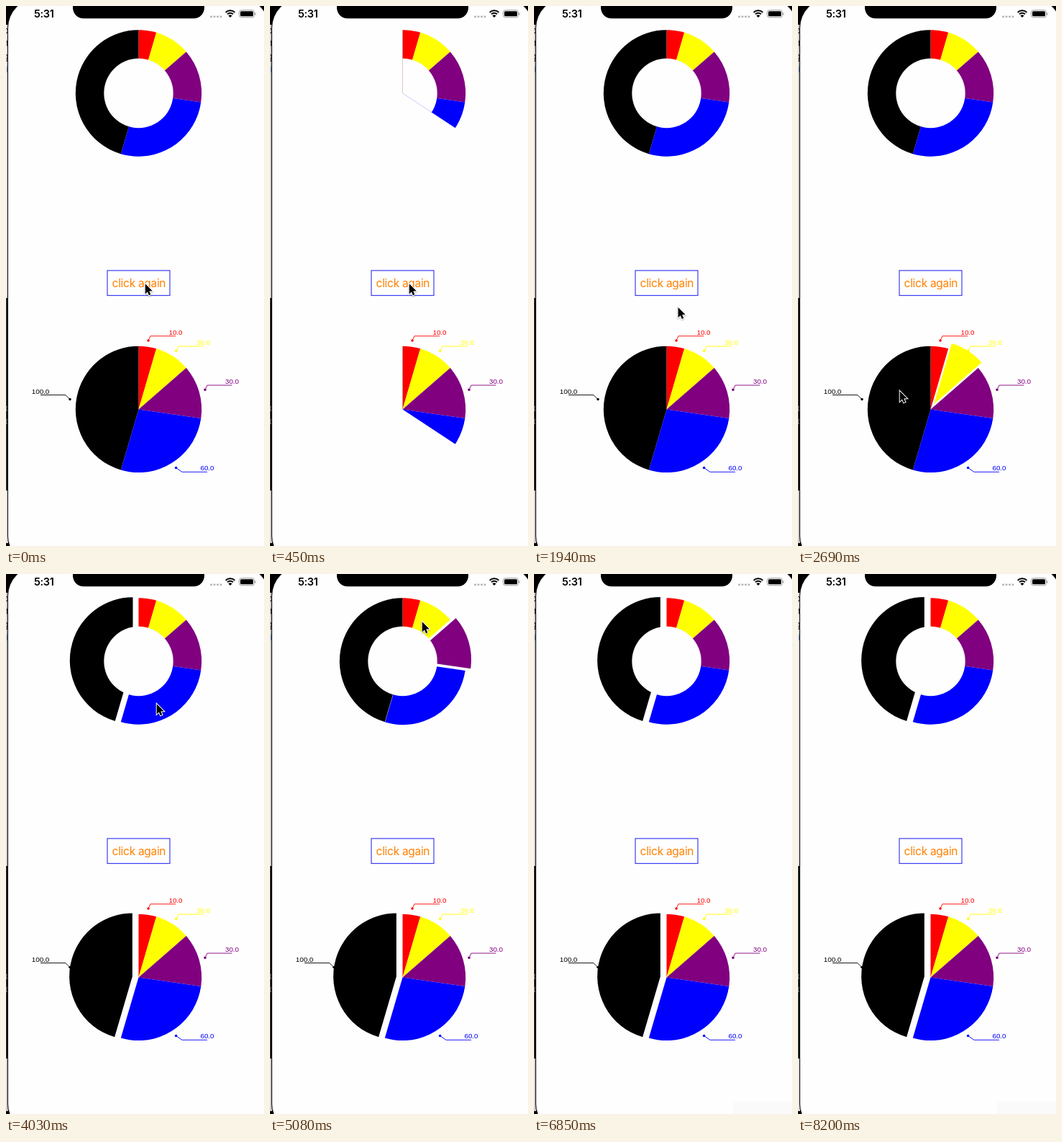
Write an HTML page with a canvas that moves like this. It is 359 px wide and 749 px high and loops after 8.3 s.

```html
<!DOCTYPE html>
<html lang="en">
<head>
<meta charset="utf-8">
<title>Pie charts</title>
<style>
html, body { margin: 0; width: 100%; height: 100%; overflow: hidden; background: #000; }
canvas { display: block; width: 359px; height: 749px; }
</style>
</head>
<body>
<canvas id="stage"></canvas>
<script>
const W = 359, H = 749, LOOP = 8300, STEP = 149.2;
const TAU = Math.PI * 2, PAPER = '#fefefe';
const canvas = document.getElementById('stage');
const ctx = canvas.getContext('2d');
const dpr = window.devicePixelRatio || 1;
canvas.width = Math.round(W * dpr);
canvas.height = Math.round(H * dpr);

const RADIUS = 87.7, HOLE = 48.2, POP = 8.75;
// Callout: dot, elbow, end of the line, text baseline
const slices = [
  { value: 10, color: '#ff0000', line: [198, 464, 201, 457.8, 236, 457.8], base: 456 },
  { value: 20, color: '#ffff00', line: [236.8, 478.2, 240, 472, 274.5, 472], base: 470.3 },
  { value: 30, color: '#800080', line: [277, 532.2, 280, 526, 314.5, 526], base: 524.3 },
  { value: 60, color: '#0000ff', line: [236.6, 640.6, 245, 646.3, 280, 646.3], base: 644.3 },
  { value: 100, color: '#000000', line: [89, 545.6, 82.8, 539.5, 48, 539.5], base: 537.8 }
];
const total = slices.reduce((sum, s) => sum + s.value, 0);
let angle = -TAU / 4;
for (const s of slices) {
  s.from = angle;
  angle += s.value / total * TAU;
  s.to = angle;
  s.mid = (s.from + s.to) / 2;
}

// Taps: time, slice index
const ring = { x: 184.5, y: 121, hole: true, taps: [[3860, 4], [4100, 3], [4898, 2], [5140, 1], [5600, 4]] };
const pie = { x: 184.5, y: 559.4, hole: false, taps: [[2330, 1], [2900, 4]] };

// Pointer path: time, x, y
const path = [
  [0, 193, 384], [1800, 193, 384], [2290, 217, 499], [2390, 215, 503],
  [2680, 141, 533], [3100, 141, 533], [3700, 122, 112], [3870, 122, 114],
  [4025, 209, 179], [4250, 209, 179], [4780, 251, 108], [4910, 250, 105],
  [5070, 211, 65], [5240, 211, 66], [5540, 132, 86], [5660, 134, 92],
  [5968, 280, 414], [6117, 321, 724], [6266, 345, 770]
];

const clamp = v => Math.max(0, Math.min(1, v));
const ease = x => 1 - Math.pow(1 - clamp(x), 2.3);

function popped(chart, index, t) {
  const past = chart.taps.filter(tap => tap[0] <= t);
  if (!past.length) return 0;
  const last = past[past.length - 1], before = past[past.length - 2];
  const p = ease((t - last[0]) / 250);
  if (last[1] === index) return p;
  return before && before[1] === index ? 1 - p : 0;
}

function pointerAt(t) {
  const i = path.findIndex(k => k[0] > t);
  if (i < 0) return null;
  const a = path[i - 1], b = path[i];
  const p = (t - a[0]) / (b[0] - a[0]);
  return [a[1] + (b[1] - a[1]) * p, a[2] + (b[2] - a[2]) * p];
}

function box(color, x, y, w, h, r = 0) {
  ctx.fillStyle = color;
  ctx.beginPath();
  ctx.roundRect(x, y, w, h, r);
  ctx.fill();
}

function dot(color, x, y, r) {
  ctx.fillStyle = color;
  ctx.beginPath();
  ctx.arc(x, y, r, 0, TAU);
  ctx.fill();
}

function text(str, x, y, font, color, align = 'left', spacing = 0) {
  ctx.font = font;
  ctx.fillStyle = color;
  ctx.textAlign = align;
  ctx.letterSpacing = spacing + 'px';
  ctx.fillText(str, x, y);
}

function desktop(t) {
  const dim = t >= 100 && t < 8190;
  const light = dim ? '#c6c6c6' : '#dddddd';
  box('#000', 0, 0, W, H);
  box(light, 0, 26, 4, 379);
  box(dim ? '#1e1a22' : '#20222a', 0, 405, 8, 267);
  box(light, 0, 672, 3, 73);
  [['o', 38], ['t', 56], ['g', 74], ['i', 92]].forEach(([ch, y]) =>
    text(ch, 3.5, y, '12px "Liberation Sans", Arial, sans-serif', ch === 'i' ? '#1040a0' : '#222', 'right'));
  [562, 580].forEach(y =>
    text('c', 5, y, '12px "Liberation Sans", Arial, sans-serif', '#8a8c94', 'right'));
}

function phone() {
  box('#000', 2, -11, 365, 787, 41);
  box(PAPER, 3, -10, 363, 785, 40);
  box('#000', 93, -20, 183, 37.3, 15);
  text('5:31', 39, 16, '600 14.5px Inter, "Open Sans", sans-serif', '#000', 'left', -0.35);
  for (let i = 0; i < 4; i++) dot('#b4b4b4', 285.5 + i * 4.5, 14.7, 1.5);

  ctx.strokeStyle = '#000';
  ctx.lineWidth = 2;
  for (const r of [9.2, 5.8]) {
    ctx.beginPath();
    ctx.arc(312, 15.5, r, -TAU / 4 - 0.77, -TAU / 4 + 0.77);
    ctx.stroke();
  }
  ctx.fillStyle = '#000';
  ctx.beginPath();
  ctx.moveTo(312, 16);
  ctx.arc(312, 16, 3.6, -TAU / 4 - 0.77, -TAU / 4 + 0.77);
  ctx.fill();

  ctx.strokeStyle = '#999';
  ctx.lineWidth = 1;
  ctx.beginPath();
  ctx.roundRect(324.5, 5.8, 21, 10, 3);
  ctx.stroke();
  box('#000', 326, 7.3, 18, 7, 1.6);
  box('#999', 346.5, 9.2, 1.2, 3.4, 0.6);
}

function button() {
  ctx.strokeStyle = '#3c3cf5';
  ctx.lineWidth = 1.2;
  ctx.strokeRect(141, 366.9, 87, 34.6);
  text('click again', 147.6, 389.8, '15.4px Inter, Roboto, sans-serif', '#ff8000', 'left', -0.25);
}

function callout(s) {
  const [x, y, bx, by, ex, ey] = s.line;
  dot(s.color, x, y, 1.75);
  ctx.strokeStyle = s.color;
  ctx.lineWidth = 0.9;
  ctx.beginPath();
  ctx.moveTo(x, y);
  ctx.lineTo(bx, by);
  ctx.lineTo(ex, ey);
  ctx.stroke();
  text(s.value.toFixed(1), ex, s.base, '9.9px "Liberation Sans", Arial, sans-serif', s.color, 'center');
}

function drawChart(chart, t) {
  const sweep = t < 100 ? 1 : clamp((t - 105) / 1000);
  ctx.save();
  if (sweep < 1) {
    ctx.beginPath();
    ctx.moveTo(chart.x, chart.y);
    ctx.arc(chart.x, chart.y, 240, -TAU / 4, -TAU / 4 + sweep * TAU);
    ctx.closePath();
    ctx.clip();
  }
  slices.forEach((s, i) => {
    const d = POP * popped(chart, i, t);
    const x = chart.x + d * Math.cos(s.mid), y = chart.y + d * Math.sin(s.mid);
    ctx.fillStyle = s.color;
    ctx.beginPath();
    ctx.moveTo(x, y);
    ctx.arc(x, y, RADIUS, s.from, s.to);
    ctx.closePath();
    ctx.fill();
  });
  if (chart.hole) dot(PAPER, chart.x, chart.y, HOLE);
  else slices.forEach(callout);
  ctx.restore();
}

function pointer(t) {
  const at = pointerAt(t);
  if (!at) return;
  ctx.save();
  ctx.translate(at[0] + 0.7, at[1] + 1.2);
  ctx.beginPath();
  [[0, 0], [0, 14.2], [3.2, 11.2], [5.3, 16], [7.7, 15], [5.6, 10.3], [10, 10.1]]
    .forEach(p => ctx.lineTo(p[0], p[1]));
  ctx.closePath();
  ctx.strokeStyle = '#fff';
  ctx.lineWidth = 2;
  ctx.shadowColor = 'rgba(0,0,0,.3)';
  ctx.shadowBlur = 2 * dpr;
  ctx.shadowOffsetY = dpr;
  ctx.stroke();
  ctx.shadowColor = 'transparent';
  ctx.fillStyle = '#000';
  ctx.fill();
  ctx.restore();
}

function draw(t) {
  ctx.setTransform(dpr, 0, 0, dpr, 0, 0);
  desktop(t);
  phone();
  drawChart(ring, t);
  button();
  drawChart(pie, t);
  ctx.globalAlpha = clamp((t - 6300) / 550);
  box('#fafafa', 277, 732, 82, 17);
  ctx.globalAlpha = 1;
  pointer(t);
}

// The screen refreshes in coarse, even steps
const start = performance.now();
function tick() {
  const t = (performance.now() - start) % LOOP;
  draw(Math.floor((t + 14) / STEP) * STEP);
  requestAnimationFrame(tick);
}
tick();
</script>
</body>
</html>
```
